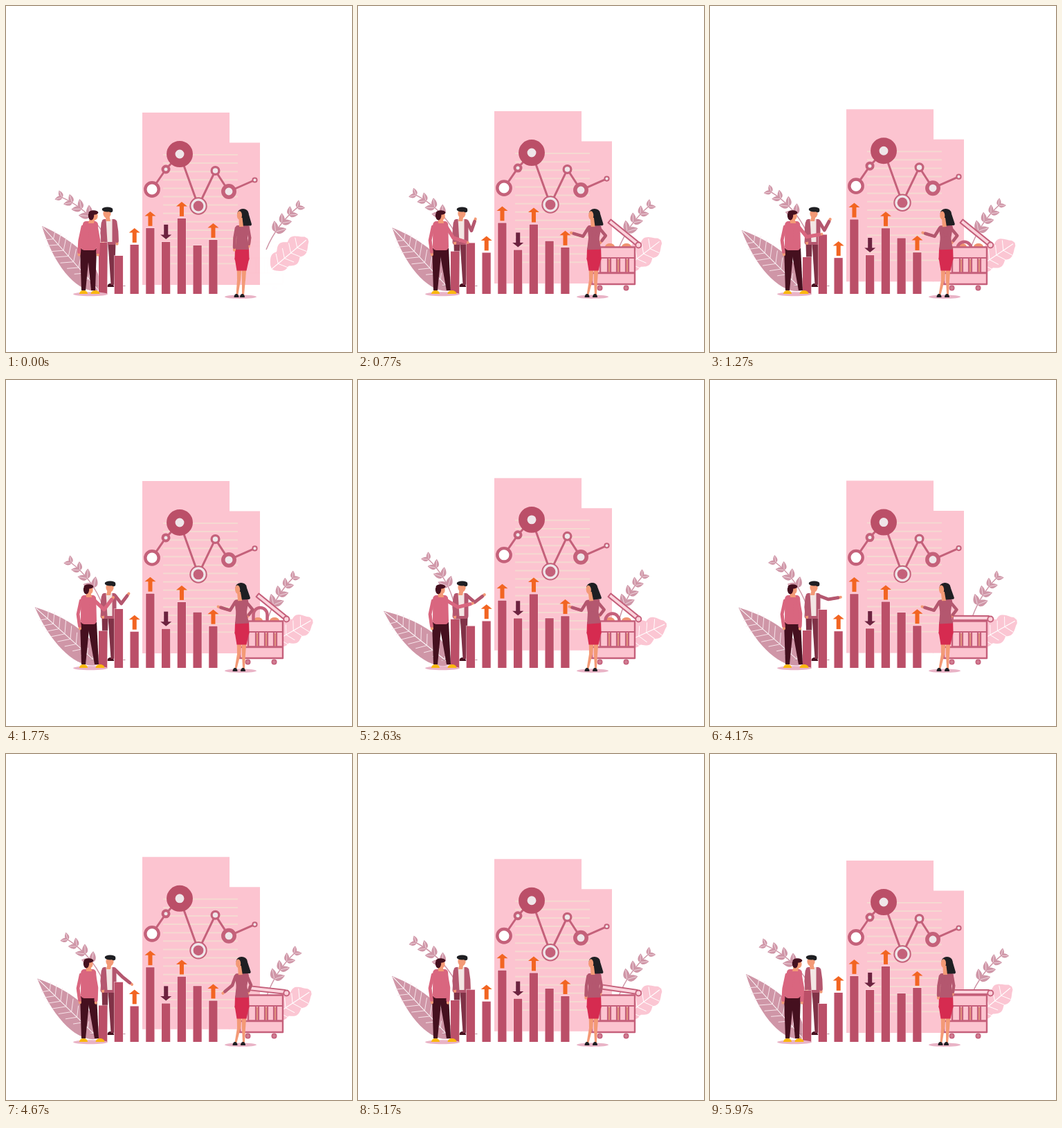
Animation, 500 px wide and 500 px high, one loop 6000 ms. Source, as an HTML page with a canvas:

```html
<!DOCTYPE html>
<html lang="en">
<head>
<meta charset="utf-8">
<title>Growth chart</title>
<style>
html, body { margin: 0; width: 100%; height: 100%; overflow: hidden; background: #fff; }
canvas { display: block; width: 500px; height: 500px; }
</style>
</head>
<body>
<canvas id="stage" width="500" height="500"></canvas>
<script>
const ctx = document.getElementById('stage').getContext('2d');
const LOOP = 6000;
const C = {
  paper: '#fcc4d0', rule: '#f5d9d1', bar: '#bb4f68', link: '#c4617a',
  leaf: '#cf96a7', vein: '#f8e6ec', skin: '#f39a76', dark: '#45101f',
  jacket: '#b4576f', sweater: '#d9667f', trousers: '#803247', skirt: '#d62b50',
  hair: '#1f1f23', shadow: '#e9b3c6', up: '#f26522', down: '#6d2340',
  cart: '#c5607b', shoe: '#fbb80f'
};
const rad = d => d * Math.PI / 180;
const mix = (a, b, k) => a + (b - a) * k;
function ease(t, a, b) {
  const u = Math.min(1, Math.max(0, (t - a) / (b - a)));
  return u * u * (3 - 2 * u);
}
// Rises from a to b, stays, falls from c to d.
const hold = (t, a, b, c, d) => ease(t, a, b) - ease(t, c, d);

function paint(fill, stroke, w) {
  if (fill) { ctx.fillStyle = fill; ctx.fill(); }
  if (stroke) { ctx.strokeStyle = stroke; ctx.lineWidth = w; ctx.stroke(); }
}
function trace(points, closed) {
  ctx.beginPath();
  points.forEach(([x, y]) => ctx.lineTo(x, y));
  if (closed) ctx.closePath();
}
function line(x1, y1, x2, y2, color, w) {
  trace([[x1, y1], [x2, y2]]);
  paint(null, color, w);
}
function rect(x, y, w, h, fill, stroke, lw) {
  ctx.beginPath();
  ctx.rect(x, y, w, h);
  paint(fill, stroke, lw);
}
function oval(x, y, rx, ry, fill, stroke, w) {
  ctx.beginPath();
  ctx.ellipse(x, y, rx, ry, 0, 0, 2 * Math.PI);
  paint(fill, stroke, w);
}
const dot = (x, y, r, fill, stroke, w) => oval(x, y, r, r, fill, stroke, w);
// Runs draw with (x, y) as origin, turned by deg.
function place(x, y, deg, draw) {
  ctx.save();
  ctx.translate(x, y);
  ctx.rotate(rad(deg));
  draw();
  ctx.restore();
}
const turn = (x, y, deg, draw) =>
  place(x, y, deg, () => { ctx.translate(-x, -y); draw(); });

// Upright shape of varying width, corners rounded by r.
function taper(x1, y1, w1, x2, y2, w2, color, r = 0) {
  trace([[x1 - w1 / 2 + r, y1 + r], [x1 + w1 / 2 - r, y1 + r],
    [x2 + w2 / 2 - r, y2 - r], [x2 - w2 / 2 + r, y2 - r]], true);
  paint(color, r && color, 2 * r);
}

function paper(dy) {
  ctx.save();
  ctx.translate(0, dy);
  rect(197, 154, 126, 249, C.paper);
  rect(322, 197.5, 45, 205.5, C.paper);
  for (let i = 0; i < 14; i++) line(227, 215 + 12.1 * i, 335, 215 + 12.1 * i, C.rule, 2);
  // x, y, ring radius, ring width
  const nodes = [[211, 265, 9.7, 4.4], [231, 236, 4.5, 4], [251, 214, 12.7, 12.5],
    [278, 289, 11.7, 2], [302.5, 238, 5.4, 3.2], [322, 268, 8.2, 5.5], [359.5, 251.5, 3.1, 2]];
  trace(nodes);
  paint(null, C.link, 3);
  nodes.forEach(([x, y, r, w], i) => dot(x, y, r, i ? '#efe6e9' : '#fff', i === 2 ? C.bar : C.link, w));
  dot(278, 289, 7.4, C.link);
  ctx.restore();
}

// Almond blade from the origin along x.
function blade(len, w, color) {
  ctx.beginPath();
  ctx.moveTo(0, 0);
  ctx.bezierCurveTo(len * .12, w, len * .55, w, len, 0);
  ctx.bezierCurveTo(len * .55, -w, len * .12, -w, 0, 0);
  paint(color);
}

function bigLeaf() {
  blade(124, 26, C.leaf);
  line(0, 0, 122, 0, '#fff', 1);
  for (let i = 1; i < 10; i++) {
    const x = i * 11, w = 20 * Math.sin(Math.PI * (1 - i / 10.5) ** .8);
    [-1, 1].forEach(s => line(x, 0, x + w * .6, s * w * .8, C.vein, .9));
  }
}

// Twig along x that bends by `bend`, with leaf pairs growing towards the base.
function twig(len, bend) {
  const at = u => [len * u, bend * 4 * u * (1 - u)];
  ctx.beginPath();
  ctx.moveTo(0, 0);
  ctx.quadraticCurveTo(len / 2, bend * 2, len, 0);
  paint(null, C.leaf, 1.5);
  for (let i = 0; i < 4; i++) {
    const u = .97 - i * .2, size = 11 + i * 1.7;
    const tilt = Math.atan(bend * 4 * (1 - 2 * u) / len) * 180 / Math.PI;
    [-40, 42].forEach(a => place(...at(u), tilt + a, () => {
      blade(size, size * .38, C.leaf);
      line(1, 0, size - 2, 0, '#f3dce4', .8);
    }));
  }
}

function lobedLeaf() {
  const len = 68, edge = [];
  for (let i = 0; i <= 80; i++) {
    const u = 1 - Math.abs(1 - i / 40);
    const w = 21 * Math.sqrt(Math.sin(Math.PI * u)) * (.74 + .26 * Math.abs(Math.sin(3.2 * Math.PI * u)));
    edge.push([len * u, i < 40 ? -w : w * .85]);
  }
  trace(edge, true);
  paint('#fbc6d3');
  line(0, 0, len - 3, 0, '#fff', 1.1);
  for (let x = 12; x < 60; x += 12)
    [-1, 1].forEach(s => line(x, 0, x + 7, s * 13, '#fff', .9));
}

function cart(t) {
  const open = hold(t, 0, 700, 3300, 4100);
  const rise = hold(t, 800, 1700, 2000, 3600);
  const bounce = t > 4100 && t < 5900 ? Math.sin(Math.PI * (t - 4100) / 1800) ** 2 : 0;
  ctx.save();
  ctx.globalAlpha = Math.min(1, t / 400);

  ctx.save();
  ctx.beginPath();
  ctx.rect(345, 300, 60, 48);
  ctx.clip();
  [364, 388].forEach(x => oval(x, 353 - 5 * open, 7, 5, '#ef9270'));
  const top = 352 - 25 * rise;
  ctx.beginPath();
  ctx.arc(367.5, top + 12, 10, Math.PI, 0);
  ctx.lineTo(377.5, top + 32);
  ctx.moveTo(357.5, top + 32);
  ctx.lineTo(357.5, top + 12);
  paint(null, C.cart, 4.5);
  ctx.restore();

  turn(404, 345, 39 * open + 9 * bounce, () =>
    rect(351, 341, 52, 6, '#fbd3dc', C.cart, 2));
  rect(338, 386, 62, 16, C.paper, C.cart, 2.4);
  rect(350, 348.5, 50, 37, C.paper, C.cart, 2.4);
  line(350, 364, 400, 364, C.cart, 2);
  for (let x = 361; x < 400; x += 13) {
    line(x, 365, x, 385, C.cart, 2.2);
    line(x + 4, 365, x + 4, 385, C.cart, 2.2);
    line(x + 2, 366, x + 2, 384, '#d9825f', 1.4);
  }
  [349.5, 387.5].forEach(x => dot(x, 407.5, 3.2, '#cf7d92', C.cart, 1.6));
  dot(405.3, 345.5, 4, '#fbd3dc', C.cart, 1.9);
  ctx.restore();
}

function arrow(x, y, color, deg) {
  place(x, y, deg, () => {
    trace([[0, -10.5], [8, -4], [-8, -4]], true);
    paint(color);
    rect(-3, -5, 6, 15.5, color);
  });
}
function bars(t) {
  const tops = [342, 361, 345, 321, 341, 307, 346, 338];
  const travel = [22, -32, 20, -13, 20, 15, -11, 19];
  const a = 2 * Math.PI * t / 3000;
  const v = (1 - Math.cos(a)) / 2 + .055 * Math.sin(a) ** 2;
  tops.forEach((top, i) => {
    const x = 134 + i * 22.75, y = top + travel[i] * v;
    rect(x - .8, y - .8, 13.8, 417 - y, 'rgba(255,232,237,.6)');
    rect(x, y, 12.2, 416 - y, C.bar);
    const mark = '--uudu-u'[i];
    if (mark === 'u') arrow(x + 6.2, y - 13.6, C.up, 0);
    if (mark === 'd') arrow(x + 6.2, y - 14.6, C.down, 180);
  });
}

// Two bones; angles in degrees from straight down, positive to the right.
function arm(x, y, a1, a2, l1, l2, color, w = 4.8) {
  const ex = x + l1 * Math.sin(rad(a1)), ey = y + l1 * Math.cos(rad(a1));
  const dx = Math.sin(rad(a2)), dy = Math.cos(rad(a2));
  line(ex, ey, ex + dx * l2, ey + dy * l2, C.skin, 4);
  trace([[x, y], [ex, ey], [ex + dx * (l2 - 4), ey + dy * (l2 - 4)]]);
  paint(null, color, w);
}
function shoe(x, y, w, color) {
  ctx.beginPath();
  ctx.ellipse(x, y, w / 2, 5, 0, Math.PI, 2 * Math.PI);
  paint(color);
}

function suitMan(t, stance) {
  const lift = hold(t, 0, 700, 4300, 5100), dx = 4 * stance;
  line(122, 404.5, 172, 404.5, '#b98a99', 1.2);
  shoe(151, 406, 10, C.dark);
  taper(143, 342, 9, 143, 403, 6, C.trousers);
  taper(153, 342, 11, 154, 403, 5, C.trousers);
  taper(149, 308, 21, 148, 345, 23, C.jacket, 4);
  taper(149, 308, 9, 150, 341, 7, '#f3e6e4');
  taper(146 + dx, 302, 6, 148, 311, 6, C.skin);
  oval(146 + dx, 300, 5.6, 6.5, C.skin);
  oval(146.5 + dx, 294, 7.8, 3.4, C.hair);
  dot(151.5 + dx, 295.5, 2.8, C.hair);
  arm(140, 314, -5, 5, 14, 15, C.jacket);
  arm(158, 312, mix(8, 15 + .013 * t, lift), mix(2, 175 - .018 * t, lift), 14, 18, C.jacket);
}

function casualMan(t, stance) {
  const lift = hold(t, 0, 700, 3200, 4000), dx = -7 * stance, lean = dx * .4;
  const sweep = 110 - 38 * Math.cos(2 * Math.PI * (t - 770) / 2400);
  oval(122, 416.3, 25, 3, C.shadow);
  shoe(112, 416, 12, C.shoe);
  shoe(129 + 7 * stance, 416, 13, C.shoe);
  taper(114, 350, 14, 112, 411, 6, C.dark);
  taper(124, 350, 14, 126 + 5 * stance, 411, 6, C.dark);
  arm(111 + lean, 319, -12, mix(-4, 8, stance), 20, 21, C.sweater);
  taper(122 + lean, 311, 22, 119.5, 353, 23, C.sweater, 5);
  arm(130 + lean, 318, mix(10, 20 + .015 * t, lift), mix(-2, sweep, lift), 20, 22, C.sweater, 5.2);
  taper(125 + dx, 304, 7, 123 + lean, 314, 8, C.skin);
  oval(128 + dx, 303.5, 4.6, 6, C.skin);
  oval(123 + dx, 303, 4.2, 6.5, C.dark);
  oval(126.5 + dx, 298.5, 6.8, 3.2, C.dark);
}

function woman(t, sway, stance) {
  const lift = hold(t, 0, 800, 4300, 5000), lean = -5 * sway;
  const dx = 32 * Math.sin(rad(lean));
  oval(339, 420.2, 23, 2.8, C.shadow);
  [[337, 334 - 2 * stance], [344, 342.5 + stance]].forEach(([x, foot]) => {
    taper(x, 380, 6.5, x - .5, 397, 5, C.skin);
    taper(x - .5, 396, 5, foot, 417, 3, C.skin);
    shoe(foot - 1, 421, 7, C.hair);
  });
  taper(341, 349, 20, 341, 368, 21, C.skirt, 2);
  taper(341, 364, 21, 340.5, 382.5, 14, C.skirt);
  arm(350 + dx, 322, mix(10, 40, lift), mix(-8, -38, lift), 13, 13, C.jacket, 4.4);
  turn(341, 352, lean, () => {
    taper(342, 317, 20, 341, 340, 15, C.jacket, 3);
    taper(341, 334, 15, 341, 352, 20, C.jacket);
    oval(342.5, 299.5, 8, 6.5, C.hair);
    taper(344, 298, 13, 347.5, 317.5, 15, C.hair, 2);
    taper(339, 306, 5, 340, 319, 6, C.skin);
    oval(337.4, 302.5, 3.6, 6.2, C.skin);
  });
  arm(333 + dx, 321, mix(-10, -32, lift), mix(-2, -107, lift), 14, 18, C.jacket, 4.6);
}

function draw(t) {
  const sway = (1 - Math.cos(2 * Math.PI * t / LOOP)) / 2;
  const stance = hold(t, 0, 850, 5200, LOOP);
  ctx.clearRect(0, 0, 500, 500);
  ctx.lineJoin = 'round';
  ctx.lineCap = 'butt';
  paper(-12.6 * sway);
  place(134, 411, -131.4 - 10.5 * sway, bigLeaf);
  place(140, 327, -140 + 21 * sway, () => twig(80, 6));
  place(376, 352, -53 - 10 * sway, () => twig(78, -5));
  place(384, 380, -40 + 16 * sway, lobedLeaf);
  ctx.lineCap = 'round';
  suitMan(t, stance);
  ctx.lineCap = 'butt';
  bars(t);
  cart(t);
  ctx.lineCap = 'round';
  casualMan(t, stance);
  woman(t, sway, stance);
}

const start = performance.now();
function tick() {
  draw((performance.now() - start) % LOOP);
  requestAnimationFrame(tick);
}
tick();
</script>
</body>
</html>
```
